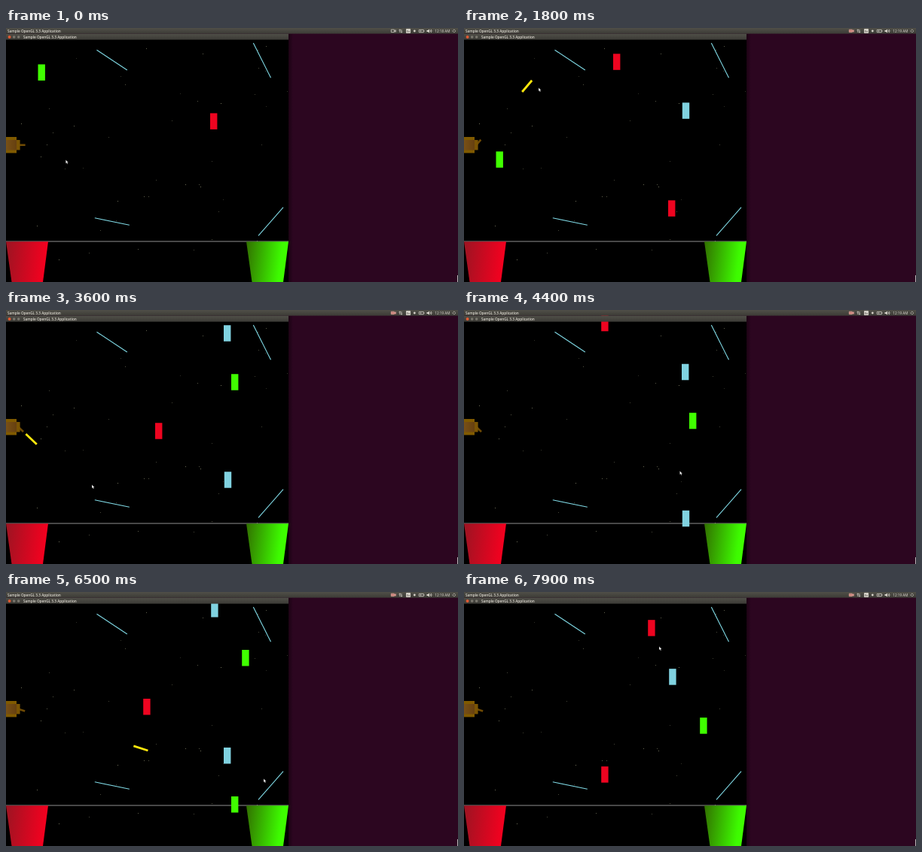
Write an HTML page that moves like this. It is 600x338 px and loops after 8000 ms.

```html
<!DOCTYPE html>
<html lang="en">
<head>
<meta charset="utf-8">
<title>Brick shooter</title>
<style>
  html, body { margin: 0; width: 100%; height: 100%; overflow: hidden; background: #2c0620; }
  svg { display: block; width: 100vw; height: 100vh; }
  text { font-family: "Open Sans", "Noto Sans", sans-serif; fill: #dfdbd2; }
  .title { font-size: 4.7px; font-weight: 600; }
  .mirror { stroke: #7fd8e4; stroke-width: 1.1; }
  .icon { fill: none; stroke: #d5d1c8; stroke-width: .8; }
  .solid { fill: #d5d1c8; }
  .recording { fill: #c9837a; stroke: #e0a098; }
</style>
</head>
<body>
<svg viewBox="0 0 600 338" preserveAspectRatio="none">
  <defs>
    <linearGradient id="bar" x2="0" y2="1">
      <stop stop-color="#504f48"/><stop offset="1" stop-color="#3c3b36"/>
    </linearGradient>
    <linearGradient id="red" x2="1" y2=".12">
      <stop stop-color="#9c1422"/><stop offset="1" stop-color="#f6001f"/>
    </linearGradient>
    <linearGradient id="green" x2="1" y2=".12">
      <stop stop-color="#327000"/><stop offset=".85" stop-color="#3dfa00"/><stop offset="1" stop-color="#40ff00"/>
    </linearGradient>
    <linearGradient id="shade">
      <stop stop-color="#1c0314"/><stop offset="1" stop-color="#2c0620"/>
    </linearGradient>
    <linearGradient id="gun">
      <stop stop-color="#785016"/><stop offset="1" stop-color="#664010"/>
    </linearGradient>
  </defs>

  <rect width="600" height="338" fill="#2c0620"/>
  <rect x="375" y="8" width="6" height="330" fill="url(#shade)"/>
  <rect y="15" width="375" height="323"/>
  <g id="stars"></g>
  <g id="mirrors"></g>
  <path d="M0 284H375" stroke="#a0a0a0" stroke-width=".9"/>
  <path d="M0 284.3H56L49 338H7.5Z" fill="url(#red)"/>
  <path d="M319 284.3H375L368 338H326.5Z" fill="url(#green)"/>

  <g id="bricks"></g>
  <rect id="laser" x="-10" y="-1.4" width="20" height="2.8" fill="#ffe80c"/>
  <rect id="barrel" y="-1.3" width="9.2" height="2.6" fill="#6e4a04"/>
  <rect y="145" width="14" height="21.4" fill="#805a00"/>
  <rect y="149" width="18.6" height="13.4" fill="#7a5404"/>
  <rect y="149" width="14" height="13.4" fill="url(#gun)"/>

  <rect y="7.6" width="375" height="8" fill="url(#bar)"/>
  <rect width="600" height="7.6" fill="url(#bar)"/>
  <text class="title" x="2" y="5.6">Sample OpenGL 3.3 Application</text>
  <text class="title" x="23" y="13.6">Sample OpenGL 3.3 Application</text>
  <circle cx="4.6" cy="12" r="2" fill="#e25a33"/>
  <circle cx="10.7" cy="12" r="1.8" fill="#7b786f"/>
  <circle cx="16.7" cy="12" r="1.8" fill="#7b786f"/>

  <path id="camera" class="icon" d="M511.3 2.2H515.4V5.6H511.3ZM515.4 4L517.3 2.6V5.3Z"/>
  <path class="icon" d="M522.8 6V2M521.6 3.2L522.8 1.8L524 3.2M525 2V6M523.9 4.9L525 6.2L526.3 4.9"/>
  <rect class="solid" x="531" y="1" width="6" height="6" rx=".7"/>
  <text x="531.8" y="5.5" font-size="3.8" style="fill:#3c3b37">En</text>
  <circle class="solid" cx="542.3" cy="4" r="1.4"/>
  <path class="icon" d="M548.3 2.4H554.3V5.7H548.3ZM555 3.4V4.7M550.6 3V5.2"/>
  <path class="solid" d="M558.5 3H560L562 1.4V6.6L560 5H558.5Z"/>
  <path class="icon" d="M563 2.6Q564.2 4 563 5.4M564.2 1.8Q566 4 564.2 6.2"/>
  <text id="clock" x="569.3" y="5.6" font-size="4.6"></text>
  <circle class="icon" cx="594.8" cy="4" r="1.7" stroke-dasharray="1 .3"/>
  <rect x="599" y="329" width="1" height="9" fill="#b9b3b6"/>

  <path id="cursor" d="M0 0V4.6L1.1 3.7L1.9 5.5L2.8 5.1L2 3.4H3.4Z" fill="#fff" stroke="#222" stroke-width=".25"/>
</svg>
<script>
const LOOP = 8000, STEP = 100;
const GUN = { x: 17, y: 156 };
const LASER_SPEED = 0.347, FALL_SPEED = 0.0644;   // px per ms
const BRICK_TOP = 113.4, BRICK_GAP = 65, FLOOR = 272.6;
const COLORS = { r: '#ee0420', g: '#40ff00', b: '#80d2e0' };
const RAD = Math.PI / 180;
const $ = id => document.getElementById(id);

function add(parent, tag, attrs) {
  const el = document.createElementNS('http://www.w3.org/2000/svg', tag);
  for (const key in attrs) el.setAttribute(key, attrs[key]);
  return $(parent).appendChild(el);
}

function place(el, { x, y }, angle = 0) {
  el.setAttribute('transform', `translate(${x} ${y}) rotate(${angle})`);
}

function show(el, on) {
  el.setAttribute('visibility', on ? 'visible' : 'hidden');
}

function along({ x, y }, angle, d) {
  return { x: x + d * Math.cos(angle * RAD), y: y + d * Math.sin(angle * RAD) };
}

// Night sky
let seed = 7;
const random = () => (seed = seed * 16807 % 2147483647) / 2147483647;
for (let i = 0; i < 48; i++) {
  const level = 45 + 70 * random();
  add('stars', 'rect', {
    x: Math.floor(375 * random()), y: Math.floor(18 + 300 * random()),
    width: 1, height: 1, fill: `rgb(${level},${level},${level * .8})`
  });
}

const mirrors = [
  [120.5, 29.2, 160.8, 56], [328.3, 20, 351.5, 66.3],
  [117.8, 252.8, 163.8, 262.2], [335, 276.4, 368, 238.7]
].map(([x1, y1, x2, y2]) => {
  add('mirrors', 'line', { class: 'mirror', x1, y1, x2, y2 });
  return { x: x1, y: y1, angle: Math.atan2(y2 - y1, x2 - x1) / RAD };
});

// Bricks enter one after another, evenly spaced
const lanes = [271, 42.5, 289.8, 198, 299, 289, 182.2, 313.2, 272.2, 244.2];
const bricks = lanes.map((x, i) => add('bricks', 'rect', {
  x, width: 9.4, height: 21.5, fill: COLORS['rgbrgbrgbr'[i]]
}));

// A shot flies from the gun to its mirror and bounces; it may destroy a brick at its end
const shots = [
  { born: 1503, end: 2650, aim: -49.7, mirror: mirrors[0] },
  { born: 3534, end: 4200, aim: 43.6, mirror: mirrors[2], brick: 3 },
  { born: 6010, end: 7850, aim: 17.8, mirror: mirrors[3] }
];
for (const s of shots) {
  const { x, y, angle } = s.mirror, a = angle * RAD;
  s.reach = ((x - GUN.x) * Math.sin(a) - (y - GUN.y) * Math.cos(a)) / Math.sin((angle - s.aim) * RAD);
  s.bounce = 2 * angle - s.aim;
}

// Places the pointer passes: [time, x, y]
const pointer = [
  [0, 79.3, 175.6], [500, 32, 193], [1800, 99, 79.5], [2800, 20.6, 151.5], [3600, 114, 232.5],
  [4500, 308, 212], [5200, 328.6, 207.8], [6000, 350, 262], [6500, 342, 248.5], [7900, 259, 72.5]
];

function pointerAt(t) {
  const i = Math.max(1, pointer.findIndex(k => k[0] >= t));
  const [t0, x0, y0] = pointer[i - 1], [t1, x1, y1] = pointer[i];
  const p = (t - t0) / (t1 - t0);
  return { x: x0 + (x1 - x0) * p, y: y0 + (y1 - y0) * p };
}

function drawLaser(shot, t) {
  const d = LASER_SPEED * (t - shot.born), past = d - shot.reach;
  if (past < 0) place($('laser'), along(GUN, shot.aim, d), shot.aim);
  else place($('laser'), along(along(GUN, shot.aim, shot.reach), shot.bounce, past), shot.bounce);
}

function draw(t) {
  bricks.forEach((el, i) => {
    const y = BRICK_TOP - BRICK_GAP * i + FALL_SPEED * t;
    const destroyed = shots.some(s => s.brick === i && t >= s.end);
    el.setAttribute('y', y);
    show(el, y > -7 && y < FLOOR && !destroyed);
  });

  const shot = shots.filter(s => s.born <= t).pop();
  const flying = shot && t < shot.end;
  show($('laser'), flying);
  if (flying) drawLaser(shot, t);
  place($('barrel'), { x: 16.4, y: 155.7 }, shot ? shot.aim : 0);
  place($('cursor'), pointerAt(t));

  $('clock').textContent = t < 400 ? '12:18 AM' : '12:19 AM';
  $('camera').classList.toggle('recording', t >= 400);
}

const begin = performance.now();
function tick() {
  const t = (performance.now() - begin) % LOOP;
  draw(Math.floor(t / STEP) * STEP);
  requestAnimationFrame(tick);
}
tick();
</script>
</body>
</html>
```
